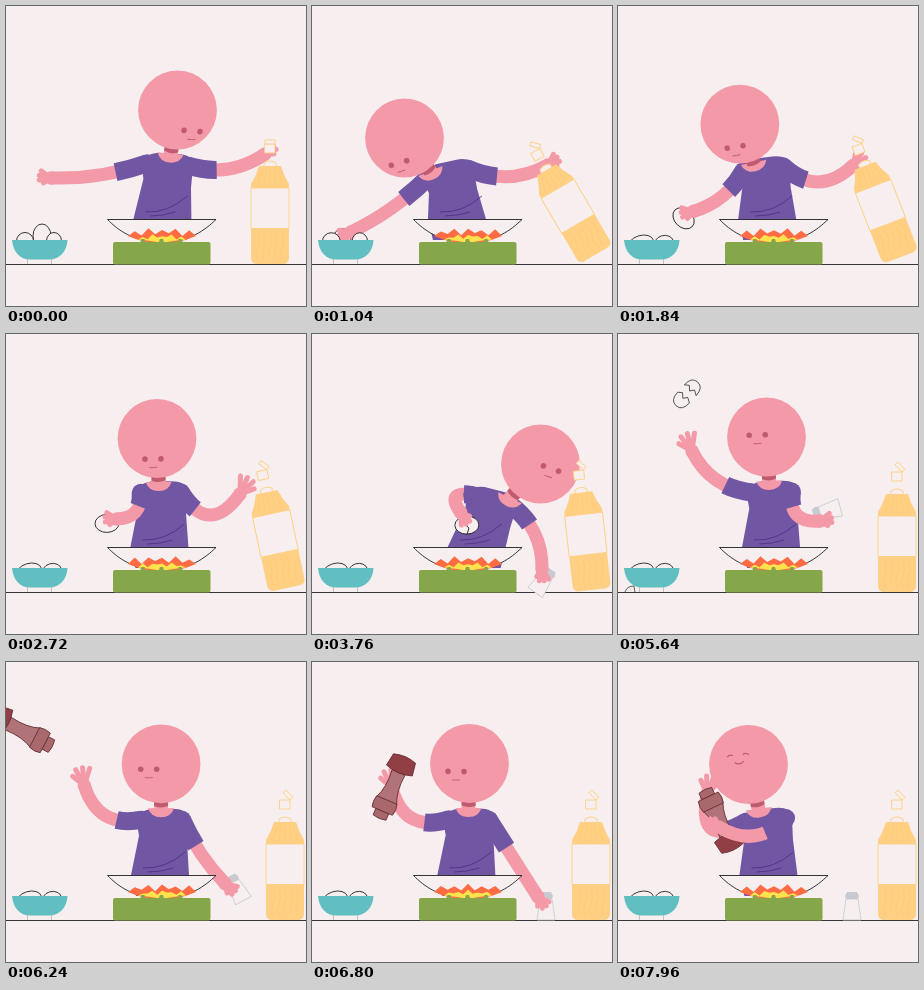
Animation, 300 px wide and 300 px high, one loop 8 s. Source, as an HTML page with a canvas:

```html
<!DOCTYPE html>
<html lang="en">
<head>
<meta charset="utf-8">
<title>Cook</title>
<style>
html, body { margin: 0; width: 100%; height: 100%; overflow: hidden; background: #f7eeef; }
canvas { display: block; width: 300px; height: 300px; }
</style>
</head>
<body>
<canvas id="stage"></canvas>
<script>
const LOOP = 8000, TAU = Math.PI * 2;
const BG = '#f7eeef', SKIN = '#f499a8', SHADE = '#bf5a70', SHIRT = '#7156a4', FOLD = '#4a3585';
const INK = '#222', OIL = '#ffd083', OIL_LINE = '#ffc76c', GREY = '#c9cacf';
const WOOD = '#a8686c', WOOD_LINE = '#632f35', GREEN = '#86a64a';
const canvas = document.getElementById('stage');
const ctx = canvas.getContext('2d');
const ratio = window.devicePixelRatio || 1;
canvas.width = canvas.height = 300 * ratio;

// Key poses: reached at `at`, kept until `until`. Hands are [x, y, elbow bend];
// parts that are not named stay as in the pose before.
const poses = [
  { at: 0, head: [171.5, 104], look: [14.5, 21], left: [45, 172, 9], right: [259, 148, 19] },
  { at: 900, until: 1440, head: [92.5, 132], look: [-5.5, 25], left: [39, 226, 8], right: [236, 159, 20] },
  { at: 2240, until: 3280, head: [151, 104.5], look: [-4, 20.5], left: [111, 185, 18], right: [234, 160, 44] },
  { at: 3500, head: [195, 114], right: [270, 236, 0] },
  { at: 3740, until: 4300, head: [228.5, 130], look: [10.5, 4.5], left: [149, 179, -26], right: [230, 235, -18] },
  { at: 5020, head: [148.5, 103], look: [-9.3, -2], left: [128, 188, 18], right: [202, 187, 25] },
  { at: 5400, until: 5740, left: [74, 117, 20] },
  { at: 6500, until: 6840, head: [157.5, 101.5], look: [-13.5, 8], left: [80, 126, 34], right: [226, 235, 0] },
  { at: 7520, head: [130.5, 102.5], look: [-10.5, -9.5], left: [89, 132, 52], right: [101, 165, -27] }
];
poses.forEach((pose, i) => poses[i] = { ...poses[i - 1], until: pose.at, ...pose });

const mix = (a, b, k) => a.map((v, i) => v + (b[i] - v) * k);
function ease(t, start, end) {
  const u = Math.max(0, Math.min(1, (t - start) / (end - start)));
  return u * u * (3 - 2 * u);
}
function turn(x, y, angle) {
  const c = Math.cos(angle), s = Math.sin(angle);
  return [x * c - y * s, x * s + y * c];
}

function poseAt(t) {
  const i = poses.findLastIndex(pose => pose.at <= t);
  const a = poses[i], b = poses[i + 1] || a;
  const k = ease(t, a.until, b.at);
  const [head, look, left, right] = ['head', 'look', 'left', 'right'].map(part => mix(a[part], b[part], k));

  // The whole body leans after the head.
  const lean = (head[0] - 155) * .58;
  const neck = [155 + lean, 148 + (head[1] - 103) * .62];
  const chest = [156 + lean * .6, 150 + (neck[1] - 148) * .5];
  const tilt = lean * .006;
  const onChest = (x, y) => {
    const [dx, dy] = turn(x, y, tilt);
    return [chest[0] + dx, chest[1] + dy];
  };
  return {
    head, look, neck, onChest, faceTilt: lean * .008, waist: 154 + lean * .25,
    left: makeArm(onChest(-20, 8), left, -1),
    right: makeArm(onChest(20, 8), right, 1)
  };
}

function makeArm(shoulder, [x, y, bend], side) {
  const dx = x - shoulder[0], dy = y - shoulder[1], length = Math.hypot(dx, dy);
  const elbow = [
    (shoulder[0] + x) / 2 - side * dy / length * bend,
    (shoulder[1] + y) / 2 + side * dx / length * bend
  ];
  return { shoulder, elbow, x, y, side, length, angle: Math.atan2(y - elbow[1], x - elbow[0]) };
}

function shape(path, fill, line, width = .9) {
  const p = typeof path === 'string' ? new Path2D(path) : path;
  if (fill) { ctx.fillStyle = fill; ctx.fill(p); }
  if (line) { ctx.strokeStyle = line; ctx.lineWidth = width; ctx.stroke(p); }
}
function ellipse(x, y, rx, ry, fill, line, angle = 0) {
  const p = new Path2D();
  p.ellipse(x, y, rx, ry, angle, 0, TAU);
  shape(p, fill, line);
}
function place([x, y], angle, draw) {
  ctx.save();
  ctx.translate(x, y);
  ctx.rotate(angle);
  draw();
  ctx.restore();
}

function drawArm({ shoulder, elbow, x, y, side, length, angle }, grip) {
  const curve = `M${shoulder}Q${elbow} ${x} ${y}`;
  shape(curve, null, SKIN, 13);
  ctx.lineCap = 'round';
  for (let i = 0; i < 4; i++) {
    const a = angle + side * (i - 1.5) * .4;
    const reach = 18 - 6 * grip - (i === 3 ? 3 : 0);
    shape(`M${x} ${y}l${Math.cos(a) * reach} ${Math.sin(a) * reach}`, null, SKIN, 5);
  }
  ctx.lineCap = 'butt';
  ellipse(x, y, 6.7, 6.7, SKIN);
  ellipse(...shoulder, 9, 9, SHIRT);
  ctx.setLineDash([Math.min(33, length * .38), 999]);
  shape(curve, null, SHIRT, 18);
  ctx.setLineDash([]);
}

function drawTorso({ onChest: p, waist: w }) {
  shape(`M${p(-26, 6)}Q${p(-22, -1)} ${p(-10, -3)}L${p(10, -3)}Q${p(25, -3)} ${p(26, 6)}L${p(25, 30)}
    L${w + 29} 213L${w + 24} 234H${w - 24}L${w - 29} 213L${p(-23, 24)}Z`, SHIRT);
  shape(`M${w - 17} 206Q${w + 6} 207 ${w + 25} 190M${w - 12} 210Q${w + 1} 210 ${w + 13} 206`, null, FOLD);
}

function drawHead({ head: [x, y], look, neck: [nx, ny], faceTilt }, smiling) {
  const up = Math.atan2(x - nx, ny - y);
  place([nx, ny], up * .6, () => shape('M-13 -1Q-10 8 0 8T13 -1Z', SKIN));
  place([x, y], up, () => {
    shape('M-7 30H7V48H-7Z', SKIN);
    shape('M-7 30H7V42Q0 45 -7 42Z', SHADE);
  });
  ellipse(x, y, 39.4, 39.4, SKIN);
  place([x + look[0], y + look[1]], faceTilt, () => {
    if (smiling) {
      shape('M-11 1Q-8 -2 -5 0M5 0Q8 -2 11 1M-4 7Q0 11 5 7', null, SHADE, 1.2);
    } else {
      ellipse(-8, 0, 2.8, 2.8, SHADE);
      ellipse(8, 0, 2.8, 2.8, SHADE);
      shape('M-4 8.5Q0 9 4 8.3', null, SHADE);
    }
  });
}

// Taken from the bowl, carried at the fingertips, then thrown.
function drawEgg(hand, t) {
  const held = [hand.x + 10 * Math.cos(hand.angle), hand.y + 10 * Math.sin(hand.angle) + 4];
  const thrown = [69 - .12 * (t - 5640), 54 + .0009 * (t - 5560) ** 2];
  const spot = mix(mix([36, 230], held, ease(t, 880, 1040)), thrown, ease(t, 5150, 5350));
  if (spot[1] > 250) return;
  const angle = 1.57 - 1.6 * ease(t, 1440, 2240) - .8 * ease(t, 5100, 5640);
  place(spot, angle, () => {
    if (t < 5100) {
      ellipse(0, 0, 12, 9, BG, INK);
      if (t > 3700) shape('M-1 -9l3 5l-4 3l4 4l-2 6', null, INK);
      return;
    }
    const gap = ease(t, 5100, 5500) * 5;
    for (const x of [-gap, gap]) {
      const edge = x + Math.sign(x) * 11;
      shape(`M${x} -8Q${edge} -8 ${edge} 0Q${edge} 8 ${x} 8l3 -5l-4 -3l4 -4Z`, BG, INK, .7);
    }
  });
}

// Gripped rigidly until it is put down.
function drawSalt(hand, t) {
  if (t < 3480) return;
  const angle = .62 * ease(t, 3500, 3740) - 2.45 * ease(t, 4300, 5020) + 1.83 * ease(t, 5740, 6500);
  const [dx, dy] = turn(8, 9, angle);
  place(t < 6500 ? [hand.x + dx, hand.y + dy] : [234, 244], angle, () => {
    shape('M-6 -7H6L9 14H-9Z', BG, GREY, .8);
    shape('M-5 -14H5L7 -10L6 -7H-6L-7 -10Z', GREY);
  });
}

// Flies into the left hand, then is turned over.
function drawMill(hand, t) {
  const flip = ease(t, 6840, 7520), caught = ease(t, 6000, 6480);
  const angle = .4 - 3 * (1 - caught) + 2.3 * flip;
  const [dx, dy] = turn(0, -28 * flip, angle);
  const spot = mix([-45, 95], [hand.x + dx, hand.y + dy], caught);
  place([spot[0], spot[1] - 40 * Math.sin(caught * Math.PI)], angle, () => {
    shape('M-7 25H7V32Q0 34 -7 32Z', WOOD, WOOD_LINE, .8);
    shape('M-7 -17H7Q5 2 11 14H-11Q-5 2 -7 -17Z', '#b07478', WOOD_LINE, .8);
    shape('M-11 13H11Q13 19 11 25H-11Q-13 19 -11 13Z', WOOD, WOOD_LINE, .8);
    shape('M-12 -32Q0 -36 12 -32L14 -19Q0 -14 -14 -19Z', '#913f45', WOOD_LINE, .8);
  });
}

function drawBottle(t) {
  const pulled = ease(t, 0, 900), released = ease(t, 1440, 2240);
  const angle = -.53 * pulled + .32 * released + .21 * ease(t, 2900, 4700);
  const x = 264 + 20 * pulled - 3 * released - 2 * ease(t, 2900, 4700);
  const open = .8 * ease(t, 300, 900) * (1 + .06 * Math.sin(t / 180));
  place([x, 258 - 19 * Math.abs(Math.sin(angle))], angle, () => {
    shape('M-6 -97V-101Q0 -105 6 -101V-97', BG, OIL);
    shape('M-11 -98H11Q14 -88 19 -80V-5Q18 0 13 0H-13Q-18 0 -19 -5V-80Q-14 -88 -11 -98Z', OIL);
    let lines = '';
    for (let i = -2; i < 3; i++) lines += `M${i * 6} -31q3 7 0 14t0 13M${i * 4} -95L${i * 6} -79`;
    shape(lines, null, OIL_LINE, .6);
    shape('M-19 -76H19V-35.5H-19Z', BG, OIL);
    shape('M-5.5 -120H5V-111H-5.5Z', BG, OIL);
    place([5, -120], open, () => shape('M-10 0V-4H0V0Z', BG, OIL));
  });
}

function drawBowl(t) {
  const sunk = ease(t, 900, 1700);
  ellipse(19 + 4 * sunk, 235 + 3 * sunk, 8.5 + 4.5 * sunk, 8.5, BG, INK, -.3 * sunk);
  ellipse(48 - 2 * sunk, 235 + 3 * sunk, 7.5 + 2.5 * sunk, 8.5, BG, INK, -.3 * sunk);
  shape('M21.5 252V258M45.5 252V258', null, '#b9b3b5', .8);
  shape('M6 234H61.5C61 246 53 253.5 43 253.5H24C14 253.5 7 246 6 234Z', '#62bfc1');
}

function drawFlame(left, right, top, height, fill, t) {
  const step = (right - left) / 10;
  let path = `M${left + 19} 236Q${left + 9} 234 ${left} ${top + height}`;
  for (let i = 1; i < 10; i++) {
    const arch = Math.sin(i / 10 * Math.PI) * 2;
    const flicker = Math.sin(t / 75 + i * 1.9 + top) * 1.2;
    path += `L${left + i * step} ${top - arch + flicker + (i % 2 ? 0 : height)}`;
  }
  shape(path + `L${right} ${top + height}Q${right - 9} 234 ${right - 19} 236Z`, fill);
}

function drawStove(t) {
  shape('M101.5 213.5H210C199 224 184 236 155.5 236S112 224 101.5 213.5Z', BG, INK);
  drawFlame(122, 190, 225, 5, '#ff6b42', t);
  drawFlame(132, 180, 231, 2.5, '#ffe34d', t);
  for (const x of [137, 155.5, 174]) shape(`M${x - 2.5} 236l1 -3h3l1 3Z`, GREEN);
  const stove = new Path2D();
  stove.roundRect(107, 236, 97.5, 22.5, 2);
  shape(stove, GREEN);
}

function render(t) {
  ctx.setTransform(ratio, 0, 0, ratio, 0, 0);
  ctx.fillStyle = BG;
  ctx.fillRect(0, 0, 300, 300);
  ctx.lineJoin = 'round';
  shape('M0 258.5H300', null, INK);
  if (t > 5400 && t < 6000) shape(`M${7 - (t - 5640) / 20} 258q2 -6 9 -6l1 6`, null, INK, .7);

  const pose = poseAt(t);
  drawTorso(pose);
  drawEgg(pose.left, t);
  drawSalt(pose.right, t);
  drawArm(pose.left, 1 - ease(t, 0, 900) * 0 - ease(t, 5020, 5400));
  drawMill(pose.left, t);
  drawArm(pose.right, 1 - ease(t, 1440, 2240) + ease(t, 2900, 3500));
  drawHead(pose, t > 7200);
  drawBottle(t);
  drawStove(t);
  drawBowl(t);
}

function frame() {
  render(performance.now() % LOOP);
  requestAnimationFrame(frame);
}
frame();
</script>
</body>
</html>
```
